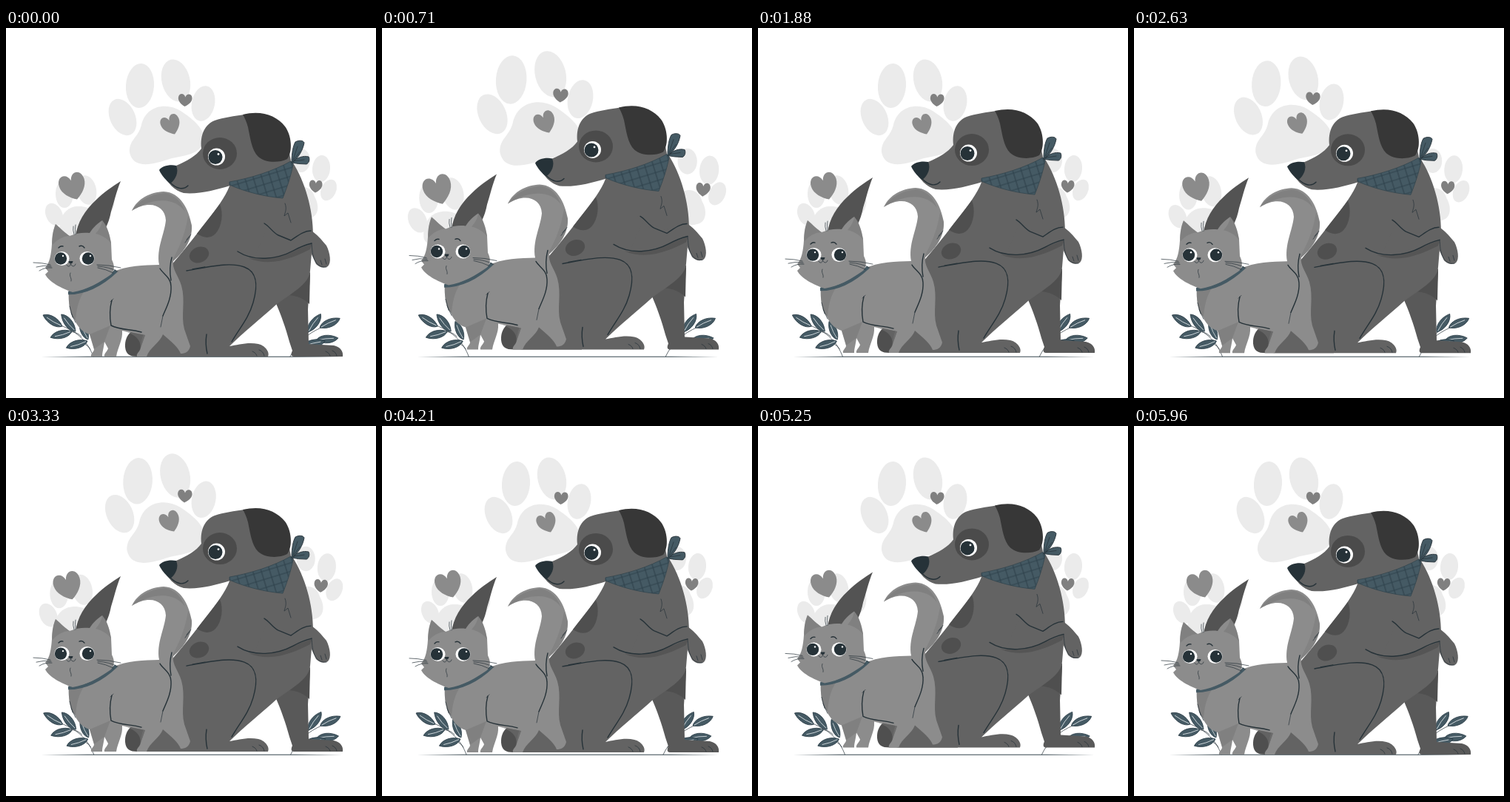
An HTML page for the animation above (6000 ms loop, 500 by 500 pixels).

```html
<!DOCTYPE html>
<html lang="en">
<head>
<meta charset="utf-8">
<title>Cat and dog</title>
<style>
html, body { margin: 0; width: 100%; height: 100%; overflow: hidden; background: #fff }
svg { display: block; width: 100%; height: 100% }
.line { fill: none; stroke: #263238; stroke-width: 1.4; stroke-linecap: round; stroke-linejoin: round }
.thin { stroke-width: .7 }
.dog { fill: #636363 }
.dark { fill: #4f4f4f }
.cat { fill: #8c8c8c }
.shade { fill: #777 }
.ink { fill: #263238 }
.blue { fill: #455a64 }
.white { fill: #fff }
</style>
</head>
<body>
<svg viewBox="0 0 500 500">
  <defs>
    <path id="heart" d="M0 .5C-.26 .36 -.52 .12 -.52 -.16C-.52 -.56 -.09 -.6 0 -.24C.09 -.6 .52 -.56 .52 -.16C.52 .12 .26 .36 0 .5Z"/>
    <g id="leaf">
      <path class="blue" stroke="#2c3e48" stroke-width=".8" d="M0 0C5 -7 19 -8 30 -1C24 6 10 7 0 0Z"/>
      <path fill="none" stroke="#dfe5e8" stroke-width=".8" d="M2 0Q13 -2 24 -1"/>
    </g>
    <pattern id="plaid" width="11" height="11" patternUnits="userSpaceOnUse" patternTransform="rotate(-17 302 210)">
      <rect width="11" height="11" fill="#455a64"/>
      <path d="M0 5H11M5 0V11" stroke="#2e414b" stroke-width="1.1"/>
    </pattern>
  </defs>

  <g id="pulse">
    <g fill="#ebebeb">
      <path d="M167 168C166 151 179 148 183 131C189 105 216 100 236 112C251 122 270 136 267 153C262 172 240 172 221 177C200 184 172 192 167 168Z"/>
      <ellipse cx="157.500" cy="120.500" rx="17" ry="26" transform="rotate(-25 157.500 120.500)"/>
      <ellipse cx="181" cy="78" rx="19" ry="30" transform="rotate(4 181 78)"/>
      <ellipse cx="229.500" cy="71" rx="19" ry="29" transform="rotate(-14 229.500 71)"/>
      <ellipse cx="266.500" cy="102" rx="15.500" ry="24" transform="rotate(12 266.500 102)"/>
      <path d="M73 275C70 258 80 242 96 241C114 240 126 250 128 264C124 284 80 292 73 275Z"/>
      <ellipse cx="65" cy="252" rx="11" ry="16" transform="rotate(-25 65 252)"/>
      <ellipse cx="79" cy="224" rx="12" ry="19"/>
      <ellipse cx="109" cy="219" rx="13" ry="20" transform="rotate(-12 109 219)"/>
      <ellipse cx="136" cy="238" rx="10" ry="16" transform="rotate(14 136 238)"/>
      <path d="M385 225C395 208 414 214 417 228C424 240 423 255 410 257C396 262 382 244 385 225Z"/>
      <ellipse cx="399" cy="179" rx="12" ry="16"/>
      <ellipse cx="426" cy="190" rx="12" ry="18" transform="rotate(5 426 190)"/>
      <ellipse cx="436" cy="219" rx="10" ry="15" transform="rotate(24 436 219)"/>
    </g>
    <g fill="#8b8b8b">
      <use href="#heart" transform="translate(90.500 214.500) rotate(-18) scale(34 36)"/>
      <use href="#heart" transform="translate(223 131) rotate(-22) scale(25 27)"/>
      <use href="#heart" transform="translate(242 97.500) rotate(4) scale(18 17)" fill="#808080"/>
      <use href="#heart" transform="translate(418.500 214) rotate(4) scale(17)" fill="#808080"/>
    </g>
  </g>

  <g id="sway">
    <path class="line thin" d="M118 444C111 425 98 411 74 402M114 434Q108 424 96 426M102 417Q94 409 86 411M384 444C392 427 406 413 428 404M390 434Q403 422 420 421M400 421Q404 414 410 410"/>
    <use href="#leaf" transform="translate(76 403) rotate(212)"/>
    <use href="#leaf" transform="translate(94 410) rotate(232)"/>
    <use href="#leaf" transform="translate(89 410) rotate(166)"/>
    <use href="#leaf" transform="translate(110 423) rotate(164)"/>
    <use href="#leaf" transform="translate(111 421) rotate(247) scale(.9)"/>
    <use href="#leaf" transform="translate(408 411) rotate(-53)"/>
    <use href="#leaf" transform="translate(424 405) rotate(-23)"/>
    <use href="#leaf" transform="translate(419 422) rotate(-4)"/>
    <use href="#leaf" transform="translate(402 430) rotate(-12)"/>
  </g>

  <path fill="#37474f" d="M48 444.200L110 443.700H390L455 444.200L390 444.800H110Z"/>

  <g id="bob">
    <!-- dog -->
    <path fill="#535353" d="M94 282C96 263 107 246 121 233C132 222 144 214 155 207C149 221 146 236 142 248C139 264 132 280 120 288Z"/>
    <path class="dark" d="M190 400C172 405 160 414 161 431C162 441 167 444 178 444H270V380Z"/>
    <path fill="#595959" d="M364 370C371 386 378 405 383 424L387 436C385 440 385 444 389 444H455C456 437 452 431 443 429L409 427L408 380L411 333Z"/>
    <path class="dark" d="M411 330L410 373C403 366 393 361 380 361Z"/>
    <path class="dog" d="M303 210C300 222 289 238 277 254C260 275 243 298 222 322C214 345 203 375 190 404C182 420 177 444 190 444H354C357 438 350 429 341 427C328 424 313 428 302 430C320 412 344 393 366 373C392 355 410 344 411 328L415 280C415 245 404 207 387 181Z"/>
    <path class="dark" d="M289 238C294 250 292 268 283 278C276 285 267 284 258 278Z"/>
    <ellipse class="dark" cx="261" cy="306.500" rx="13.500" ry="10.500" transform="rotate(-22 261 306.500)"/>
    <path fill="#555" d="M328 311C350 314 377 306 414 291L411 299C389 310 358 324 328 311Z"/>
    <path class="dog" d="M354 267L368 282C387 286 400 271 411 273C420 278 427 287 433 294C438 304 440 317 435 322C430 325 424 324 419 319L413 306L413 291C388 300 366 314 335 311Z"/>
    <path class="line" d="M349 264C356 268 360 276 368 280L385 287C394 281 402 274 412 274M313 302C335 316 366 313 388 301C397 296 405 293 413 291"/>
    <path class="line thin" d="M413 291C414 299 413 307 419 317Q424 324 433 323M425 314L427 320M431 312L433 319M377 237C380 245 377 249 376 254L381 250L385 263"/>
    <path class="line" d="M244 328C278 322 303 316 322 323C341 330 340 350 334 371C328 392 316 405 305 424M271 414Q269 427 272 440M252 326L269 323"/>
    <path class="line thin" d="M342 435Q348 437 349 443M333 437Q338 439 339 443M441 436Q446 438 447 443M432 437Q437 439 438 443"/>

    <path class="dog" d="M208 191L230 186C244 180 257 173 264 163C262 144 269 130 282 125C294 121 309 119 322 117C352 114 380 132 386 187L303 213C283 219 260 225 240 223C228 220 219 211 208 191Z"/>
    <ellipse cx="289" cy="169.500" rx="23" ry="21.500" fill="#4b4b4b"/>
    <path fill="#373737" d="M320 117C345 111 365 118 377 133C386 145 388 167 380 177C368 183 350 182 341 174C332 166 330 148 327 134C325 127 323 122 320 117Z"/>
    <circle class="white" cx="284.500" cy="174" r="11.500"/>
    <circle class="ink" cx="283" cy="174.500" r="9.500"/>
    <circle class="white" cx="287" cy="170.500" r="1.400"/>
    <path class="ink" d="M207 192C210 187 221 184 230 186C234 195 229 205 222 210C217 207 210 199 207 192Z"/>
    <path class="line" d="M222 209C231 218 240 219 246 213"/>
    <path fill="url(#plaid)" stroke="#33464f" stroke-width=".8" d="M302 208C330 203 360 194 385 180L388 184C385 201 379 217 374 230C350 228 325 222 302 212Z"/>
    <path class="blue" stroke="#263238" stroke-width=".9" d="M386 181C386 169 388 159 391 154C396 151 402 152 403 155C401 166 395 175 388 181C393 175 402 172 409 174C411 178 409 183 406 184Q395 184 386 182Z"/>
    <path class="line thin" d="M388 178L394 160M389 180L403 178M387 181L397 167"/>

    <!-- cat -->
    <path class="cat" d="M141 331C165 320 186 321 207 320C203 298 214 279 216 260C215 239 193 232 170 247C178 230 195 222 213 221C236 222 247 245 251 267C252 286 241 302 226 315C224 325 233 335 237 348C243 369 236 388 241 407L249 430C247 438 242 440 236 440C233 431 222 423 212 414C208 425 194 432 190 444H177C176 440 179 439 181 435L188 415L157 409C158 422 151 431 149 444H133C132 440 137 437 138 433L133 424C132 433 130 438 130 444H115C114 440 119 438 119 434L113 414C102 411 95 401 93 394C86 388 84 369 85 354Z"/>
    <path class="shade" d="M251 267C252 287 240 303 226 315L222 320C230 303 241 286 246 254Z" opacity=".4"/>
    <path class="shade" d="M170 247C180 232 199 223 216 223C230 226 238 237 242 248C229 230 202 227 170 247ZM85 358C94 358 100 357 106 355C98 367 95 380 94 396C86 387 84 370 85 358ZM157 409L188 415L181 435C184 424 177 414 157 409ZM133 424L119 434L113 414L141 402Z" opacity=".5"/>
    <path class="line" d="M143 368C140 379 140 391 142 402C154 408 169 407 183 411M208 325C212 332 223 337 223 349C224 365 216 379 212 389M224 310Q220 325 223 341"/>
    <path class="line thin" d="M141 370L145 366M212 389L209 404M242 290L248 282M244 286L250 279M86 376L90 391M88 385L94 398"/>
    <path fill="none" stroke="#455a64" stroke-width="4.500" d="M84 358C108 358 130 346 149 328"/>
    <path class="cat" d="M67 265C74 271 81 278 86 281C95 277 105 276 113 277C118 269 124 264 130 260C137 268 140 279 142 290L143 313C147 321 147 328 142 333C128 343 109 354 90 357C75 352 58 343 53 333L57 329L53 324C59 317 61 307 62 292C62 281 64 272 67 265Z"/>
    <path class="shade" d="M67 265C74 271 81 278 86 281C77 281 68 287 63 293C62 282 64 272 67 265ZM130 260C137 268 140 279 142 291C136 284 130 280 121 278C126 272 129 267 130 260Z" opacity=".5"/>
    <path class="line thin" d="M92 279Q90 273 91 268M94 279Q93 272 94 266"/>
    <ellipse class="white" cx="75.500" cy="311.500" rx="10" ry="9.500"/>
    <circle class="ink" cx="74" cy="311.500" r="8.200"/>
    <circle class="white" cx="77" cy="308" r="1.200"/>
    <ellipse class="white" cx="109.500" cy="311.500" rx="10" ry="9.500"/>
    <circle class="ink" cx="111" cy="311.500" r="8.200"/>
    <circle class="white" cx="114" cy="308" r="1.200"/>
    <path class="ink" d="M84.500 315H90.500Q90 318.500 87.500 318.500Q85 318.500 84.500 315Z"/>
    <path class="line" stroke-linecap="round" d="M71 297Q74 294 77 295M99 295Q103 293 106 297"/>
    <path class="line thin" d="M87.500 319C87 323 83 323 82 320M87.500 319C89 323 93 323 94 319M87 331C85 336 89 337 88 342"/>
    <path class="line thin" d="M37 317Q49 317 60 320M41 323Q51 320 61 322M45 328Q53 323 62 324M123 320Q139 320 155 324M124 322Q140 323 151 329M124 324Q135 326 145 331"/>
  </g>
</svg>
<script>
const LOOP = 6000;
const ease = u => (1 - Math.cos(Math.PI * u)) / 2;

// Keys are [percent of loop, value] pairs, eased between neighbours.
function tween(keys, percent) {
  const i = keys.findIndex(key => key[0] > percent);
  const [a, from] = keys[i - 1], [b, to] = keys[i];
  return from + (to - from) * ease((percent - a) / (b - a));
}

const beat = [[0, 1], [10, 1.1], [20, 1], [40, 1], [50, 1.1], [60, 1], [100, 1]];
const shake = [[0, 0], [10, -1], [20, 2], [30, -4], [40, 4], [50, -4],
  [60, 4], [70, -4], [80, 2], [90, -1], [100, 0]];

const [pulse, sway, bob] = ["pulse", "sway", "bob"].map(id => document.getElementById(id));
const start = performance.now();

function draw(now) {
  const t = Math.max(0, now - start) % LOOP, percent = t / LOOP * 100;
  pulse.setAttribute("transform", `translate(250 166) scale(${tween(beat, percent)}) translate(-250 -166)`);
  sway.setAttribute("transform", `translate(${tween(shake, percent)} 0)`);
  bob.setAttribute("transform", `translate(0 ${-9.6 * ease(t / 750)})`);
  requestAnimationFrame(draw);
}
draw(start);
</script>
</body>
</html>
```
